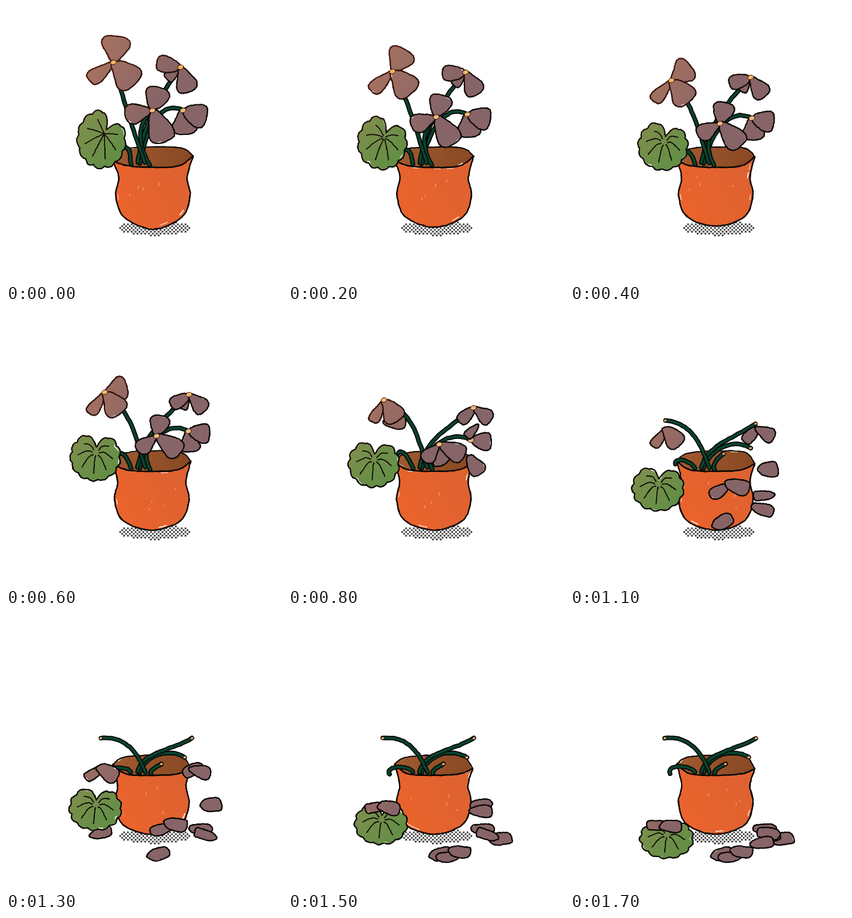
Animation, 460 px wide and 460 px high, one loop 1.8 s. Source, as an HTML page with a canvas:

```html
<!DOCTYPE html>
<html lang="en">
<head>
<meta charset="utf-8">
<title>Wilting flower</title>
<style>
  html, body { margin: 0; width: 100%; height: 100%; overflow: hidden; background: #fff; }
  canvas { display: block; width: 460px; height: 460px; }
</style>
</head>
<body>
<canvas id="stage" width="460" height="460"></canvas>
<script>
const ctx = document.getElementById('stage').getContext('2d');
const STEP = 100, STEPS = 18;
const BEATS = [0, 4, 8, 13, 17];
const FALL = 6;

// A petal turns from angle to hang, lets go at step drop and settles at x, y
const petal = (angle, hang, len, width, drop, x, y) => ({ angle, hang, len, width, drop, x, y });

// Path holds one point per beat; leave is the stem's direction at its tip, lean at its root
const flowers = [
  { path: [[295, 174], [303, 187], [305, 217], [298, 239]], root: [222, 268], leave: [206, 213], lean: -80,
    petals: [petal(87, 85, 40, 42, 6, 326, 359), petal(20, 5, 41, 38, 9, 355, 375)] },
  { path: [[291, 102], [301, 119], [309, 163], [310, 207]], root: [218, 268], leave: [127, 150], lean: -80,
    petals: [petal(140, 103, 30, 20, 6.5, 332, 368), petal(190, 125, 39, 28, 10.5, 331, 366), petal(72, 32, 42, 34, 10.5, 320, 382)] },
  { path: [[244, 174], [250, 196], [252, 224], [259, 250]], root: [242, 268], leave: [140, 150], lean: -125,
    petals: [petal(-72, -80, 39, 39, 6.2, 254, 400), petal(170, 128, 45, 36, 8.5, 266, 405), petal(67, 18, 57, 43, 8.5, 287, 396)] },
  { path: [[179, 94], [169, 124], [160, 150], [158, 207]], root: [234, 268], leave: [75, -8], lean: -110,
    petals: [petal(-82, 20, 44, 48, 6.5, 158, 365), petal(143, 115, 49, 28, 10, 147, 352), petal(46, 58, 52, 46, 10, 169, 354)] }
];
const hidden = flowers[3].petals[0];

const leaf = {
  path: [[198, 235], [190, 243], [183, 240], [171, 268], [167, 266]], root: [209, 265], leave: [20, -115], lean: -110,
  blade: [[159, 222], [155, 233], [143, 256], [149, 324], [161, 374]]
};

const mix = (a, b, k) => a + (b - a) * k;
const clamp = v => Math.max(0, Math.min(1, v));
const polar = (deg, r) => [Math.cos(deg * Math.PI / 180) * r, Math.sin(deg * Math.PI / 180) * r];
const add = (a, b) => [a[0] + b[0], a[1] + b[1]];
const between = (a, b, k) => [mix(a[0], b[0], k), mix(a[1], b[1], k)];

function along(path, step) {
  let i = 0;
  while (i < path.length - 2 && step >= BEATS[i + 1]) i++;
  return between(path[i], path[i + 1], clamp((step - BEATS[i]) / (BEATS[i + 1] - BEATS[i])));
}

function random(seed) {
  let s = (seed * 7919 + 1013) >>> 0;
  return () => {
    s = (s + 0x6d2b79f5) >>> 0;
    let t = Math.imul(s ^ (s >>> 15), s | 1);
    t ^= t + Math.imul(t ^ (t >>> 7), t | 61);
    return ((t ^ (t >>> 14)) >>> 0) / 4294967296;
  };
}

// Catmull-Rom samples through the points
function smooth(pts, closed, n = 8) {
  const len = pts.length, out = [];
  const at = i => closed ? pts[(i + len) % len] : pts[Math.max(0, Math.min(len - 1, i))];
  for (let i = 0; i < (closed ? len : len - 1); i++) {
    const p = [at(i - 1), at(i), at(i + 1), at(i + 2)];
    for (let j = 0; j < n; j++) {
      const t = j / n;
      out.push([0, 1].map(c => {
        const [a, b, d, e] = p.map(q => q[c]);
        return 0.5 * (2 * b + (d - a) * t + (2 * a - 5 * b + 4 * d - e) * t * t + (3 * b - a - 3 * d + e) * t ** 3);
      }));
    }
  }
  if (!closed) out.push(pts[len - 1]);
  return out;
}

function shade(x0, y0, x1, y1, from, to) {
  const g = ctx.createLinearGradient(x0, y0, x1, y1);
  g.addColorStop(0, from);
  g.addColorStop(1, to);
  return g;
}

const INK = shade(150, 100, 225, 200, '#45180d', '#0b0806');
const PETAL = shade(140, 100, 260, 150, '#a67260', '#876467');

const rough = (pts, rnd, amp = 0.6) => pts.map(([x, y]) => [x + (rnd() * 2 - 1) * amp, y + (rnd() * 2 - 1) * amp]);

function trace(pts, closed) {
  ctx.beginPath();
  pts.forEach(p => ctx.lineTo(...p));
  if (closed) ctx.closePath();
}

function line(pts, color, width, closed) {
  trace(pts, closed);
  ctx.strokeStyle = color;
  ctx.lineWidth = width;
  ctx.stroke();
}

// Two uneven passes give a brushed line
function ink(pts, rnd, width, closed) {
  for (let i = 0; i < 2; i++) line(rough(pts, rnd), INK, width, closed);
}

// Fill printed slightly off its ink line, with bare flecks at the edge
function print(pts, fill, rnd, width = 1.8, flecks = 1) {
  ctx.save();
  ctx.translate((rnd() - 0.5) * 2, (rnd() - 0.5) * 2);
  trace(pts, true);
  ctx.fillStyle = fill;
  ctx.fill();
  const n = pts.length, sum = pts.reduce(add);
  const center = [sum[0] / n, sum[1] / n];
  for (let i = 0; i < flecks; i++) {
    const from = Math.floor(rnd() * n);
    line([0, 1, 2].map(j => between(pts[(from + j) % n], center, 0.06)), '#fff', 0.7 + rnd());
  }
  ctx.restore();
  ink(pts, rnd, width, true);
}

function drawShadow() {
  ctx.fillStyle = '#3c3c3c';
  for (let row = -4; row <= 4; row++) {
    for (let col = -10; col <= 10; col++) {
      const x = (col + (row & 1) / 2) * 6.4, y = row * 3.1;
      if ((x / 61) ** 2 + (y / 12.5) ** 2 > 1) continue;
      ctx.beginPath();
      ctx.arc(248 + x, 370 + y, 1.65, 0, 7);
      ctx.fill();
    }
  }
}

// Petal still on its flower
function held(f, p, step) {
  const wilt = clamp(step / 9);
  const angle = mix(p.angle, p.hang, wilt), len = p.len * (1 - 0.2 * wilt);
  return { angle, len, width: p.width * (1 - 0.28 * wilt), at: add(along(f.path, step), polar(angle, len / 2 + 1)) };
}

function drawPetal(f, p, step) {
  const id = flowers.indexOf(f) * 3 + f.petals.indexOf(p);
  const own = random(id + 5), rnd = random(id * 40 + step + 100);
  const start = held(f, p, Math.min(step, p.drop));
  const k = clamp((step - p.drop) / FALL);
  const rest = Math.round(start.angle / 180) * 180 + (own() - 0.5) * 40;
  const angle = mix(start.angle, rest, k), at = between(start.at, [p.x, p.y], k ** 1.15);
  const len = mix(start.len, 38, k), w = mix(start.width, 18, k) / 2;
  const base = w * mix(0.58, 0.9, k);
  const half = [[-0.5, base * 0.35], [-0.25, base], [0.2, w], [0.46, w * 0.62]];
  const outline = [...half, ...half.map(([a, s]) => [a, -s]).reverse()].map(([a, s]) => {
    const l = a * len + (own() - 0.5) * 3, side = s + (own() - 0.5) * 3;
    return add(at, add(polar(angle, l), polar(angle + 90, side)));
  });
  print(smooth(outline, true), PETAL, rnd);
}

function drawStem({ path, root, leave, lean }, step) {
  const tip = along(path, step), reach = Math.hypot(tip[0] - root[0], tip[1] - root[1]);
  const c1 = add(tip, polar(mix(...leave, clamp(step / 13)), reach * 0.43));
  const c2 = add(root, polar(lean, reach * 0.36));
  const pts = [];
  for (let t = 0; t <= 1; t += 0.04) {
    const [a, b, c] = [between(tip, c1, t), between(c1, c2, t), between(c2, root, t)];
    pts.push(between(between(a, b, t), between(b, c, t), t));
  }
  const wob = rough(pts, random(step * 9 + root[0]), 0.45);
  line(wob, '#0b0806', 7.6);
  line(wob, '#07452f', 4);
}

function drawStamen({ path }, step) {
  const size = mix(5, 2.8, clamp((step - 8) / 3));
  ctx.beginPath();
  ctx.ellipse(...along(path, step), size, size * 0.75, -0.3, 0, 7);
  ctx.fillStyle = shade(0, 90, 0, 240, '#f5b45a', '#edc08a');
  ctx.fill();
  ctx.strokeStyle = '#35110a';
  ctx.lineWidth = 1;
  ctx.stroke();
}

// Half-widths down the pot, mirrored about its axis
function potShape(step) {
  const slump = clamp(step / 3), axis = 245 - 2 * slump;
  const tilt = 4 * Math.cos(Math.PI * step / 17);
  const profile = [[67 - 2 * slump, 254], [57, 286], [62, 316], [48, 352 - slump]];
  const left = profile.map(([w, y], i) => [axis - w, i ? y : y + tilt]);
  const right = profile.map(([w, y], i) => [axis + w, i ? y : y - tilt]).reverse();
  const [l, r] = [left[0], right[3]];
  const rim = y => [-43, 0, 43].map(x => [axis + x, y - Math.abs(x) / 16]);
  return {
    side: smooth([...left, [axis, 372 - 5 * slump], ...right]),
    back: smooth([l, [axis - 48, 239], [axis, 235], [axis + 48, 237], r]),
    front: smooth([r, ...rim(269).reverse(), l])
  };
}

function drawPot({ side, front }, step) {
  const rnd = random(step + 900);
  print([...side, ...front], shade(190, 330, 310, 270, '#ea632c', '#dc6231'), rnd, 2, 4);
  for (let i = 0; i < 4; i++) {
    const x = 192 + rnd() * 95, y = 282 + rnd() * 50;
    line([[x, y], [x + rnd() - 0.5, y + 2 + rnd() * 4]], '#f7c7b2', 0.8);
  }
}

function drawLeaf(step) {
  const rnd = random(step + 300);
  const center = along(leaf.blade, step), wilt = clamp(step / 4);
  const age = step / 17, rx = mix(40, 44, age), ry = mix(mix(48, 41, wilt), 33, age ** 2);
  const notch = mix(-58, -84, clamp(step / 6));
  const rim = (deg, r) => {
    const [x, y] = polar(notch + deg, r);
    return [center[0] + x * rx, center[1] + y * ry];
  };
  const edge = [];
  for (let d = -180; d < 180; d += 4) {
    const scallop = 0.95 + 0.08 * Math.abs(Math.sin(d * Math.PI / 28));
    edge.push(rim(d, scallop - 0.55 * Math.exp(-((d / 17) ** 2))));
  }
  const [cx, cy] = center;
  print(edge, shade(cx - 40, cy - 45, cx + 25, cy + 25, '#838f4f', '#638e45'), rnd, 1.8, 3);
  const hub = rim(0, 0.22);
  for (let d = 45; d <= 315; d += 45) {
    const end = rim(d, 0.7), bend = add(between(hub, end, 0.5), [0, -1 - 3 * wilt]);
    ink(smooth([between(hub, end, 0.2 * wilt), bend, end]), rnd, 1.3);
  }
}

function draw(step) {
  ctx.fillStyle = '#fff';
  ctx.fillRect(0, 0, 460, 460);
  ctx.lineJoin = ctx.lineCap = 'round';
  const pot = potShape(step);
  drawShadow();
  drawPetal(flowers[3], hidden, step);
  print([...pot.back, ...pot.front], shade(180, 240, 300, 262, '#a05a31', '#8a4923'), random(step + 700), 1.6);
  flowers.forEach(f => drawStem(f, step));
  drawPot(pot, step);
  drawStem(leaf, step);
  drawLeaf(step);
  for (const f of flowers) {
    f.petals.filter(p => p !== hidden).forEach(p => drawPetal(f, p, step));
    drawStamen(f, step);
  }
}

let shown = -1;
function tick() {
  const step = Math.floor(performance.now() / STEP) % STEPS;
  if (step !== shown) draw(shown = step);
  requestAnimationFrame(tick);
}
tick();
</script>
</body>
</html>
```
